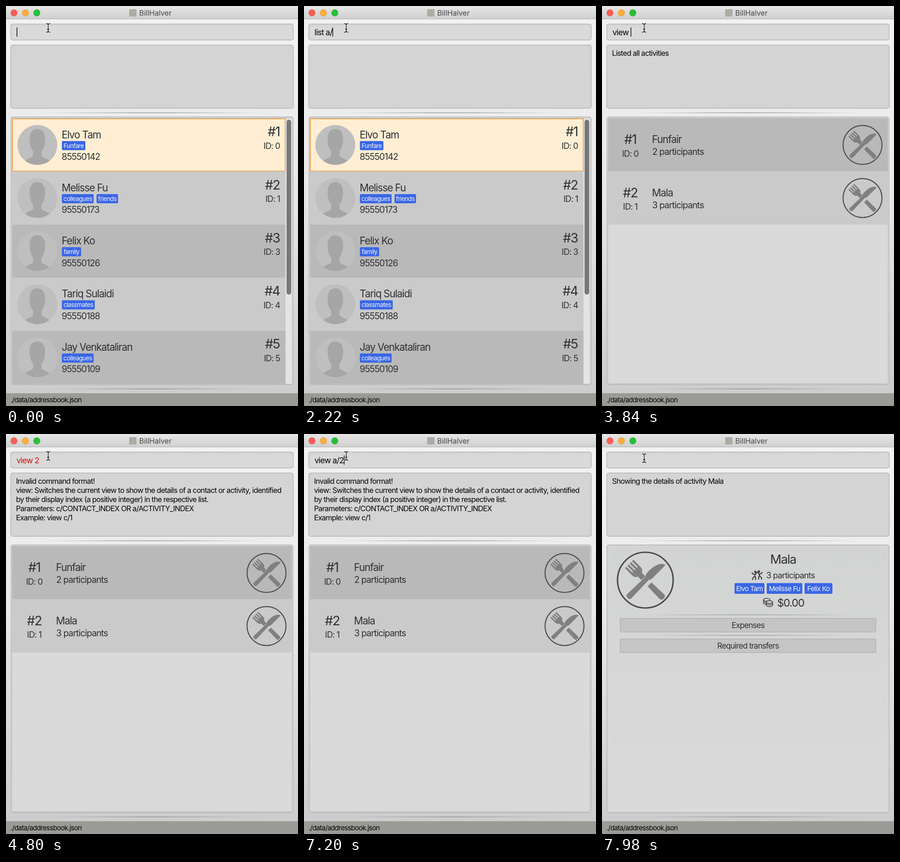
Animation, 640 px wide and 876 px high, one loop 8 s. Source, as an HTML page:

```html
<!DOCTYPE html>
<html lang="en">
<head>
<meta charset="utf-8">
<title>BillHalver</title>
<style>
html, body { margin: 0; width: 100%; height: 100%; overflow: hidden; }
svg { display: block; width: 640px; height: 876px; }
text { font-family: Inter, "Open Sans", sans-serif; font-optical-sizing: none; letter-spacing: -.05em; fill: #303034; white-space: pre; }
text.ink { fill: #050505; }
</style>
</head>
<body>
<svg id="stage" viewBox="0 0 640 876">
  <defs>
    <linearGradient id="bar" x2="0" y2="1"><stop stop-color="#e7e7e7"/><stop offset="1" stop-color="#cfcfcf"/></linearGradient>
    <linearGradient id="window" x2="0" y2="1"><stop stop-color="#f2f2f2"/><stop offset=".4" stop-color="#eaeaea"/><stop offset="1" stop-color="#cbcbcb"/></linearGradient>
    <linearGradient id="field" x2="0" y2="1"><stop stop-color="#d5d5d5"/><stop offset=".3" stop-color="#dadada"/><stop offset="1" stop-color="#d9d9d9"/></linearGradient>
    <linearGradient id="detail" x2="0" y2="1"><stop stop-color="#d2d4d3"/><stop offset="1" stop-color="#dadada"/></linearGradient>
    <radialGradient id="fade"><stop stop-color="#989898"/><stop offset="1" stop-color="#989898" stop-opacity="0"/></radialGradient>
    <clipPath id="disc"><circle r="43.7"/></clipPath>
    <g id="avatar">
      <circle r="43.7" fill="#bfbfbf"/>
      <path clip-path="url(#disc)" fill="#a6a6a6" d="M-32 44C-28 28-9 30-9 22V14C-14 9-17-1-17-13C-17-28-10-35 0-35S17-28 17-13C17-1 14 9 9 14V22C9 30 28 28 32 44Z"/>
    </g>
    <g id="meal">
      <circle r="61" fill="none" stroke="#4b4b4b" stroke-width="3.2"/>
      <g fill="#808080">
        <path transform="rotate(-45)" d="M-13-50h4.4v18h2.8v-18h4.4v18h2.8v-18h4.4v18h2.8v-18h4.4v22Q13-20 6-17V-6H-6V-17Q-13-20-13-28ZM-6 13H6L7 51Q7 57 0 57T-7 51Z"/>
        <path transform="rotate(45)" d="M5-54Q-9-47-9-18Q-9-9-5-5L-6.5 50Q-6.5 55 0 55T6.5 50L5-5L8-11V-51Q8-55 5-54Z"/>
      </g>
    </g>
    <g id="dancer" fill="none" stroke="#3c3c3c" stroke-width="2.2" stroke-linecap="round" stroke-linejoin="round">
      <circle cx="2" cy="-7" r="1.4" fill="#3c3c3c"/>
      <path d="M-5-5L-3-2H3L5-6M1-2V3M0 3L-3 6L-4 10M2 3L3 10"/>
    </g>
    <g id="coins" fill="#d4d6d5" stroke="#3c3c3c" stroke-width="1.6">
      <path d="M-7-3v7a7 3 0 0 0 14 0v-7M-7 0a7 3 0 0 0 14 0"/>
      <ellipse cy="-3" rx="7" ry="3"/>
    </g>
    <path id="beam" d="M-4-9.5Q0-9.5 0-6Q0-9.5 4-9.5M0-6V6M-4 9.5Q0 9.5 0 6Q0 9.5 4 9.5M-2 3H2"/>
  </defs>

  <rect width="640" height="876" fill="url(#window)"/>
  <rect width="640" height="28" fill="url(#bar)"/>
  <path d="M0 28.5H640" stroke="#b2b2b2"/>
  <g stroke-opacity=".12" stroke="#000">
    <circle cx="17.5" cy="15" r="7.4" fill="#fd5d55"/>
    <circle cx="42.5" cy="15" r="7.4" fill="#fdae38"/>
    <circle cx="67.5" cy="15" r="7.4" fill="#25c136"/>
  </g>
  <rect x="270" y="7" width="16" height="16" fill="#abada3"/>
  <text x="292" y="21" font-size="16" style="letter-spacing:0;fill:#454545">BillHalver</text>

  <rect x="10.5" y="39.5" width="619" height="35" rx="4" fill="url(#field)" stroke="#b2b2b2" stroke-width="1.4"/>
  <rect x="10.5" y="85.5" width="619" height="138.5" rx="4" fill="#d4d4d4" stroke="#b2b2b2" stroke-width="1.4"/>
  <g id="result"></g>
  <g id="screen"></g>
  <ellipse cx="320" cy="233.7" rx="260" ry="1.5" fill="url(#fade)"/>
  <ellipse cx="320" cy="838.5" rx="260" ry="1.5" fill="url(#fade)"/>

  <rect y="848" width="640" height="28" fill="#9a9b96"/>
  <text class="ink" x="10" y="867.5" font-size="15.1">./data/addressbook.json</text>

  <text id="command" x="23" y="63.8" font-size="17.8"></text>
  <rect id="caret" y="47" width="1.4" height="20" fill="#000"/>
  <g id="pointer" fill="none" stroke-linecap="round">
    <use href="#beam" stroke="#fff" stroke-opacity=".7" stroke-width="3"/>
    <use href="#beam" stroke="#111" stroke-width="1.4"/>
  </g>
</svg>

<script>
const $ = id => document.getElementById(id);
const ROW = 116.3;

const label = (x, y, size, text, anchor = 'start', extra = '') =>
  `<text x="${x}" y="${y}" font-size="${size}" text-anchor="${anchor}" ${extra}>${text}</text>`;
const box = (x, y, w, h, fill, extra = '') =>
  `<rect x="${x}" y="${y}" width="${w}" height="${h}" fill="${fill}" ${extra}/>`;
const tag = (x, y, w, h, size, text) =>
  box(x, y, w, h, '#3966e6', 'rx="2"') +
  label(x + w / 2, y + h / 2 + size * .36, size, text, 'middle', 'style="fill:#f4f4f4"');
const rule = (y, rx) => `<ellipse cx="320" cy="${y}" rx="${rx}" ry="1.4" fill="url(#fade)"/>`;
const shade = i => i % 2 ? '#cacaca' : '#b9b9b9';

const frame = box(10.8, 243, 618.5, 586, '#e0e0e0', 'rx="4" stroke="#b4b4b4" stroke-width="1.3"') +
  box(13, 245.3, 614, 581.7, '#dadada', 'rx="2" stroke="#b9b9b9"');

function contactRow([name, phone, id, ...tags], i) {
  let x = 122.5;
  const badges = tags.map(([text, w]) => {
    const badge = tag(x, 295.7, w, 20, 13.6, text);
    x += w + 6.5;
    return badge;
  }).join('');
  const back = i
    ? box(13.5, 246, 599, ROW, shade(i))
    : box(14, 247, 598, 114.5, '#ffeed3', 'stroke="#efa95d" stroke-width="2"');
  return `<g transform="translate(0 ${i * ROW})">${back}
    <use href="#avatar" x="68.7" y="304.3"/>
    ${label(122, 289.5, 22.2, name)}${badges}${label(122, 337, 19.6, phone)}
    ${label(600, 285.3, 28.3, '#' + (i + 1), 'end')}${label(600.5, 312.7, 18.5, 'ID: ' + id, 'end')}</g>`;
}

function activityRow([name, count], i) {
  return `<g transform="translate(0 ${i * ROW})">${box(13.5, 246, 613, ROW, shade(i))}
    ${label(62, 302.3, 28.3, '#' + (i + 1), 'middle')}${label(62, 330, 18.5, 'ID: ' + i, 'middle')}
    ${label(109.5, 300.3, 22.2, name)}${label(110, 326.3, 19.6, count + ' participants')}
    <use href="#meal" transform="translate(571 304.3) scale(.7)"/></g>`;
}

const contacts = [
  ['Elvo Tam', '85550142', 0, ['Funfare', 51.5]],
  ['Melisse Fu', '95550173', 1, ['colleagues', 69.5], ['friends', 47]],
  ['Felix Ko', '95550126', 3, ['family', 42]],
  ['Tariq Sulaidi', '95550188', 4, ['classmates', 72]],
  ['Jay Venkataliran', '95550109', 5, ['colleagues', 69.5]]
];

const screens = [
  frame + contacts.map(contactRow).join('') +
    box(613, 246, 13.5, 581, '#e4e4e4') + box(615, 249, 10, 383, '#777', 'rx="5"'),

  frame + [['Funfair', 2], ['Mala', 3]].map(activityRow).join(''),

  box(10.8, 243, 618.5, 586, 'url(#detail)', 'rx="4" stroke="#b4b4b4" stroke-width="1.5"') +
    '<use href="#meal" x="95" y="320"/>' +
    label(397, 284, 27.5, 'Mala', 'middle') +
    '<use href="#dancer" x="334" y="309"/><use href="#dancer" transform="translate(346 308) scale(-1 1)"/>' +
    label(360, 315.5, 18.4, '3 participants') +
    tag(290.5, 326.5, 65.5, 23.5, 15.1, contacts[0][0]) +
    tag(361, 326.5, 78, 23.5, 15.1, contacts[1][0]) +
    tag(444, 326.5, 61, 23.5, 15.1, contacts[2][0]) +
    '<use href="#coins" x="361" y="366"/><use href="#coins" x="367" y="371"/>' +
    label(384, 377.7, 23.4, '$0.00') +
    rule(396, 255) + rule(441, 235) +
    [['Expenses', 404], ['Required transfers', 449]].map(([text, y]) =>
      box(40, y, 560, 29.5, '#c5c5c5', 'stroke="#b8b8b8" stroke-width="2"') +
      label(320, y + 21.2, 17.3, text, 'middle')).join('')
];

const lines = (...rows) =>
  rows.map((row, i) => label(22, 108.7 + i * 20, 16.35, row, 'start', 'class="ink"')).join('');
const results = [
  '',
  lines('Listed all activities'),
  lines('Invalid command format!',
    'view: Switches the current view to show the details of a contact or activity, identified',
    'by their display index (a positive integer) in the respective list.',
    'Parameters: c/CONTACT_INDEX OR a/ACTIVITY_INDEX',
    'Example: view c/1'),
  lines('Showing the details of activity Mala')
];

// [start ms, typed text, caret visible]
const typing = [
  [0, '', 1], [240, '', 0], [720, '', 1], [1200, '', 0],
  [1680, 'l', 1], [1740, 'li', 1], [1860, 'list', 1], [1920, 'list ', 1], [2220, 'list a/', 1],
  [2520, '', 1], [3000, '', 0],
  [3240, 'v', 1], [3420, 'vi', 1], [3540, 'vie', 1], [3660, 'view', 1], [3780, 'view ', 1], [4020, 'view 2', 1],
  [4680, 'view 2', 0], [4920, 'view ', 1], [5340, 'view ', 0], [5820, 'view ', 1], [6300, 'view ', 0],
  [6480, 'view a', 1], [6660, 'view a/2', 1],
  [7320, '', 1], [7740, '', 0]
];
// [start ms, screen, result]
const views = [[0, 0, 0], [2520, 1, 1], [4200, 1, 2], [7320, 2, 3]];
const at = (list, t) => list.findLast(step => step[0] <= t);

let shownView, shownTyping;
function draw(now) {
  const t = now % 8000;
  const view = at(views, t), typed = at(typing, t);
  if (view !== shownView) {
    $('screen').innerHTML = screens[view[1]];
    $('result').innerHTML = results[view[2]];
    shownView = view;
  }
  const command = $('command');
  if (typed !== shownTyping) {
    command.textContent = typed[1].replace(/ /g, '\u00a0');
    const width = typed[1] ? command.getComputedTextLength() : 0;
    $('caret').setAttribute('x', 23.3 + width);
    $('caret').style.opacity = typed[2];
    shownTyping = typed;
  }
  command.style.fill = t >= 4200 && t < 4920 ? '#d8120f' : '#050505';
  $('pointer').setAttribute('transform', `translate(92.5 ${t >= 7980 ? 53 : 48})`);
  requestAnimationFrame(() => draw(performance.now()));
}
draw(performance.now());
</script>
</body>
</html>
```
